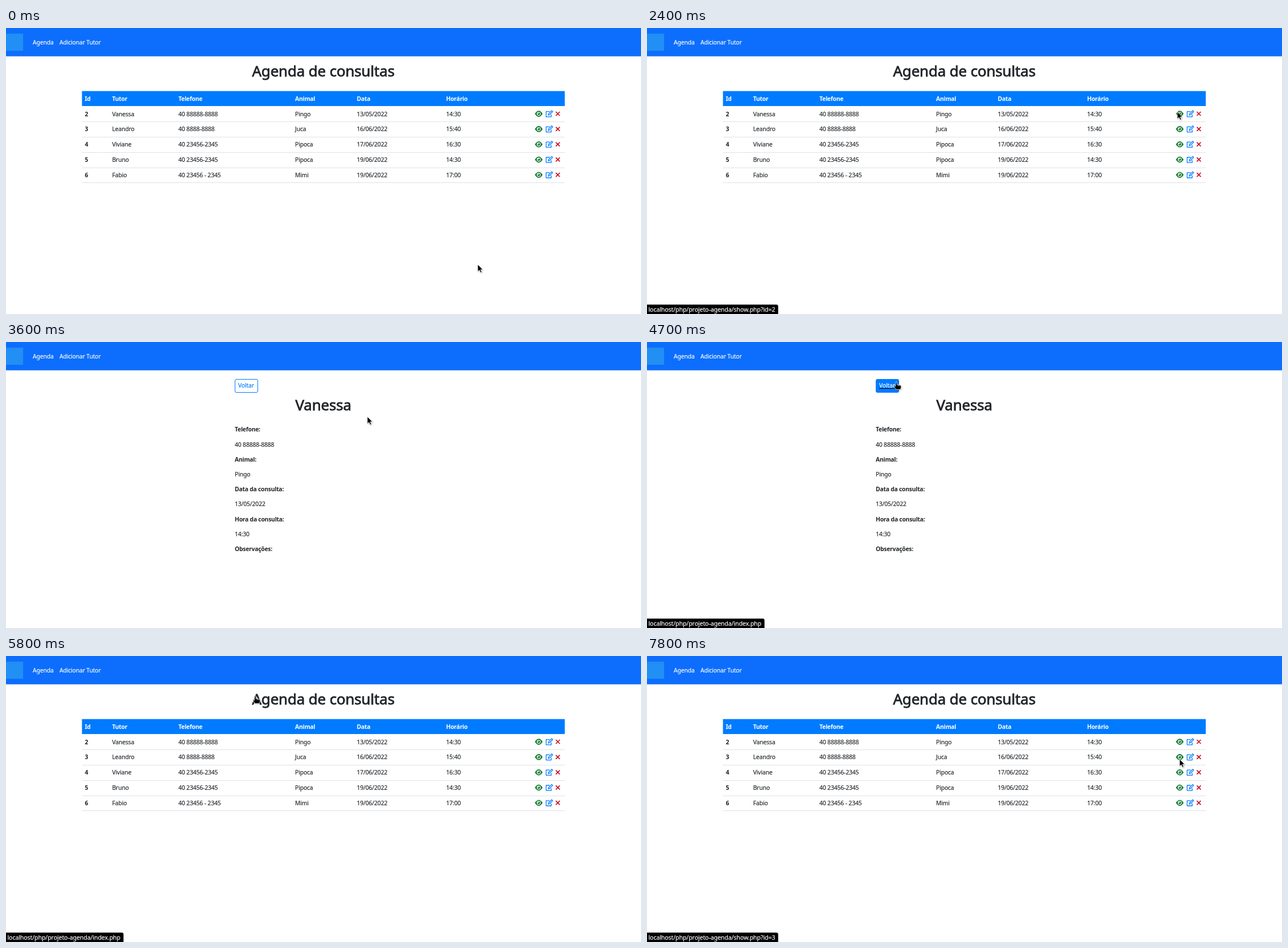
An HTML page that plays this animation: 1116x502 px, repeating every 8 s.

```html
<!DOCTYPE html>
<html lang="pt-BR">
<head>
<meta charset="utf-8">
<title>Agenda de consultas</title>
<style>
  html, body { margin: 0; width: 100%; height: 100%; overflow: hidden; background: #fff; }
  svg { display: block; color: #212529; font: 10.4px "Noto Sans", "Open Sans", sans-serif; letter-spacing: -.015em; }
  text { fill: currentColor; stroke: currentColor; stroke-width: .15; }
  .b { font-weight: 700; letter-spacing: -.025em; stroke-width: 0; }
  .h1 { font-size: 25.9px; letter-spacing: -.005em; text-anchor: middle; stroke-width: .8; }
  .w { color: #fff; }
  .line { fill: none; stroke: #007bff; stroke-width: 1.3; stroke-linejoin: round; }
  #back { color: #007bff; }
  #back rect { fill: #fff; stroke: #007bff; }
  #back.hover { color: #fff; text-decoration: underline; }
  #back.hover rect { fill: #007bff; }
  #status text { font-size: 10.7px; }
  #cursor { stroke: #fff; stroke-width: .8; stroke-linejoin: round; filter: drop-shadow(1px 1px 1px #0004); }
</style>
</head>
<body>
<svg width="1116" height="502" viewBox="0 0 1116 502">
  <defs>
    <g id="actions">
      <path fill="#127a2c" d="M929.5 0Q936.3-10.6 943.1 0Q936.3 10.6 929.5 0Z"/>
      <circle cx="936.3" r="2.9" fill="#127a2c" stroke="#fff" stroke-width="1.1"/>
      <circle cx="935.3" cy="-1" r="1" fill="#fff"/>
      <path class="line" d="M955.5-4H949.3V5.2H958.2V1.2M953 2.4l.5-2.4 5.6-5.6 1.7 1.7-5.6 5.6z"/>
      <path d="M966.3-3.6l7 7m0-7l-7 7" stroke="#cb1020" stroke-width="1.7"/>
    </g>
  </defs>
  <rect width="1116" height="49.7" fill="#0d6efd"/>
  <rect y="10" width="30" height="30" fill="#218ff3"/>
  <text class="w" x="47" y="29">Agenda</text>
  <text class="w" x="94" y="29">Adicionar Tutor</text>
  <g id="list"></g>
  <g id="detail"></g>
  <g id="status">
    <rect id="bubble" x="-4" y="485.5" height="30" rx="3"/>
    <text id="address" class="w" x="2.5" y="498"></text>
  </g>
  <path id="cursor"/>
</svg>
<script>
const $ = id => document.getElementById(id);
const text = (x, y, s, cls = '') => `<text x="${x}" y="${Math.round(y)}" class="${cls}">${s}</text>`;

const columns = [138.5, 186.5, 303, 508, 616.5, 773.5];
const heads = ['Id', 'Tutor', 'Telefone', 'Animal', 'Data', 'Horário'];
const visits = [
  ['2', 'Vanessa', '40 88888-8888', 'Pingo', '13/05/2022', '14:30'],
  ['3', 'Leandro', '40 8888-8888', 'Juca', '16/06/2022', '15:40'],
  ['4', 'Viviane', '40 23456-2345', 'Pipoca', '17/06/2022', '16:30'],
  ['5', 'Bruno', '40 23456-2345', 'Pipoca', '19/06/2022', '14:30'],
  ['6', 'Fabio', '40 23456 - 2345', 'Mimi', '19/06/2022', '17:00'],
];
const band = (y, height, fill) => `<rect x="133.5" y="${y}" width="848.5" height="${height}" fill="${fill}"/>`;
const row = (cells, y, cls) => cells.map((s, i) => text(columns[i], y, s, cls(i))).join('');

$('list').innerHTML =
  text(557.7, 85, 'Agenda de consultas', 'h1') +
  band(110.7, 26.3, '#007bff') + row(heads, 128, () => 'b w') +
  visits.map((cells, i) => {
    const mid = 150.6 + 26.8 * i;
    return row(cells, mid + 4, col => col ? '' : 'b') +
      `<use href="#actions" y="${mid}"/>` + band(Math.round(mid + 13.6), 1, '#dee2e6');
  }).join('');

const [, tutor, phone, animal, date, hour] = visits[0];
const fields = ['Telefone:', phone, 'Animal:', animal, 'Data da consulta:', date,
  'Hora da consulta:', hour, 'Observações:'];
$('detail').innerHTML =
  '<g id="back"><rect x="402.5" y="65.5" width="40" height="23" rx="2.5"/>' + text(408, 80, 'Voltar') + '</g>' +
  text(557.7, 120, tutor, 'h1') +
  fields.map((s, i) => text(402, 157.4 + 26.2 * i, s, i % 2 ? '' : 'b')).join('');

const arrow = 'M0 0V12.6L3 9.9L5 14.4L7.2 13.4L5.2 9.1H9Z';
const hand = 'M-1.2 1.2a1.2 1.2 0 0 1 2.4 0V4.6L6.6 5.6Q8.6 6 8.6 8V10L7.2 13.4H-.4L-3.6 9Q-4.2 7.2-2.6 7L-1.2 8ZM3.5 5V7.5M6 5.5V7.5';

// Arrival time and place of the pointer; it glides there in the last GLIDE ms.
const GLIDE = 200;
const stops = [
  [0, 829, 415], [700, 900, 350], [900, 943, 229], [1500, 908, 146], [1700, 932, 147],
  [3100, 886, 121], [3300, 745, 56], [3600, 635, 131], [3900, 596, 187], [4200, 429, 110],
  [4400, 438, 70], [6100, 589, 228], [6300, 785, 222], [6700, 915, 189], [7200, 936, 181],
];
// Links: when the hand shows over them and when their address shows.
const links = [
  { hand: [900, 1400], hint: [1500, 1700], page: 'show.php?id=5' },
  { hand: [1700, 2400], hint: [2000, 2900], page: 'show.php?id=2' },
  { hand: [4400, 5900], hint: [4700, 6100], page: 'index.php' },
  { hand: [7400, 7800], hint: [7800, 8200], page: 'show.php?id=3' },
];
const during = ([from, to], t) => t >= from && t < to;

function pointer(t) {
  const next = stops.findIndex(s => s[0] > t);
  if (next < 0) return stops.at(-1).slice(1);
  const [, x0, y0] = stops[next - 1], [end, x1, y1] = stops[next];
  const p = Math.max(0, 1 - (end - t) / GLIDE);
  return [x0 + (x1 - x0) * p, y0 + (y1 - y0) * p];
}

function draw() {
  const t = Math.floor(performance.now() % 8000 / 100) * 100; // the picture moves in 100 ms steps
  const inDetail = during([2600, 5800], t);
  $('list').style.display = inDetail ? 'none' : '';
  $('detail').style.display = inDetail ? '' : 'none';
  $('back').classList.toggle('hover', t >= 4400);

  $('cursor').setAttribute('d', links.some(l => during(l.hand, t)) ? hand : arrow);
  $('cursor').setAttribute('transform', `translate(${pointer(t)})`);

  const link = links.find(l => during(l.hint, t));
  $('status').style.opacity = link ? Math.min(1, (link.hint[1] - t) / 250) : 0;
  if (link) {
    $('address').textContent = 'localhost/php/projeto-agenda/' + link.page;
    $('bubble').setAttribute('width', link.page === 'index.php' ? 210.5 : 234.5);
  }
  requestAnimationFrame(draw);
}
draw();
</script>
</body>
</html>
```
